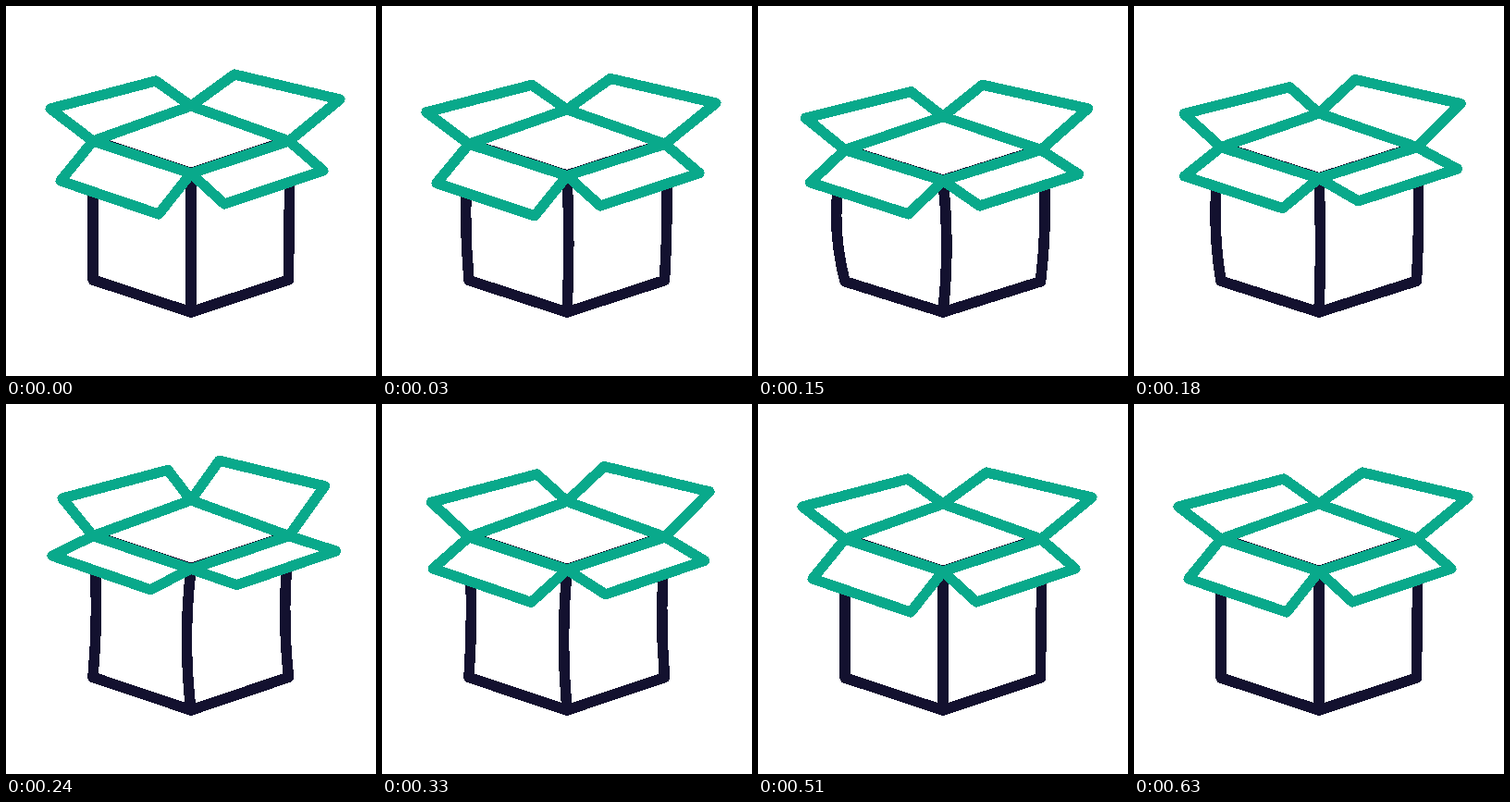
An HTML page that plays this animation: 400x400 px, repeating every 0.69 s.

```html
<!DOCTYPE html>
<html lang="en">
<head>
<meta charset="utf-8">
<title>Bouncing box</title>
<style>
  html, body { margin: 0; width: 100%; height: 100%; overflow: hidden; background: #fff; }
  svg { display: block; width: 100%; height: 100%; }
  path { stroke-linecap: round; stroke-linejoin: round; shape-rendering: crispEdges; }
  #body { fill: none; stroke: #13112f; stroke-width: 11.5; }
  #lid path { fill: #fff; stroke: #09a98b; stroke-width: 11.2; }
  #lid path:last-child { fill: none; }
</style>
</head>
<body>
<svg viewBox="0 0 400 400">
  <path id="body"/>
  <g id="lid"><path/><path/><path/><path/><path/></g>
</svg>
<script>
const LOOP = 690, STEP = 30, LAST = 630, FLOOR = 331;

// Rim corners at rest
const L = [94, 146], B = [200, 108], R = [306, 146], F = [200, 181];

// Each flap: its hinge, its two outer corners, and how far they move when lifted
const flaps = [
  { hinge: [L, B], tips: [[48, 111], [162, 81]], lift: [13, -5] },
  { hinge: [B, R], tips: [[247, 74], [361, 101]], lift: [-16.5, -8] },
  { hinge: [L, F], tips: [[59, 189], [165, 225]], lift: [-9, -22] },
  { hinge: [F, R], tips: [[236, 214], [343, 178]], lift: [13.5, -16] }
];

// height: vertical scale from the floor; lift: flaps; left, lean: bend of the edges
const keys = [
  { t: 0, height: 1, lift: 0, left: 0, lean: 0, still: true },
  { t: 90, height: 0.933, lift: 0, left: -26, lean: 14, still: true },
  { t: 180, height: 0.964, lift: 0.48, left: -12, lean: 3 },
  { t: 240, height: 1.018, lift: 1, left: 7, lean: -9, still: true },
  { t: 330, height: 1.012, lift: 0.42, left: 5, lean: -7 },
  { t: 390, height: 1, lift: 0, left: 0, lean: 0, still: true }
];

function slope(k, name) {
  if (keys[k].still) return 0;
  const a = keys[k - 1], b = keys[k + 1];
  return (b[name] - a[name]) / (b.t - a.t);
}

// Smooth curve through the keys, at rest after the last one
function value(name, t) {
  const k = keys.findIndex(key => key.t > t) - 1;
  if (k < 0) return keys[0][name];
  const a = keys[k], b = keys[k + 1], h = b.t - a.t;
  const u = (t - a.t) / h, v = 1 - u;
  return a[name] + (b[name] - a[name]) * u * u * (3 - 2 * u)
    + h * u * v * (v * slope(k, name) - u * slope(k + 1, name));
}

const body = document.getElementById("body");
const lid = document.querySelectorAll("#lid path");

function draw(t) {
  const [height, lift, left, lean] =
    ["height", "lift", "left", "lean"].map(name => value(name, t));
  const place = ([x, y]) => [x, FLOOR - (FLOOR - y) * height];
  const closed = pts => "M" + pts.map(place).join("L") + "Z";
  const edge = (from, to, bend) => {
    const a = place(from), b = place(to);
    const bow = [(a[0] + b[0]) / 2 + bend, (a[1] + b[1]) / 2];
    return `M${a}Q${bow} ${b}`;
  };

  const baseL = [94, 296], baseF = [200, FLOOR], baseR = [305.5, 296];
  const rim = [L, F, R].map(([x, y]) => place([x, y - 0.6]));
  body.setAttribute("d",
    edge(L, baseL, left) + edge(F, baseF, lean) + edge([307, 146], baseR, lean) +
    "M" + [baseL, baseF, baseR].map(place).join("L") + "M" + rim.join("L"));

  flaps.forEach(({ hinge: [a, b], tips, lift: [dx, dy] }, i) => {
    const [p, q] = tips.map(([x, y]) => [x + dx * lift, y + dy * lift]);
    lid[i].setAttribute("d", closed([a, p, q, b]));
  });
  lid[4].setAttribute("d", closed([L, B, R, F]));
}

const start = performance.now();
function tick() {
  const t = (performance.now() - start) % LOOP;
  draw(Math.min(LAST, Math.floor(t / STEP) * STEP));
  requestAnimationFrame(tick);
}
tick();
</script>
</body>
</html>
```
